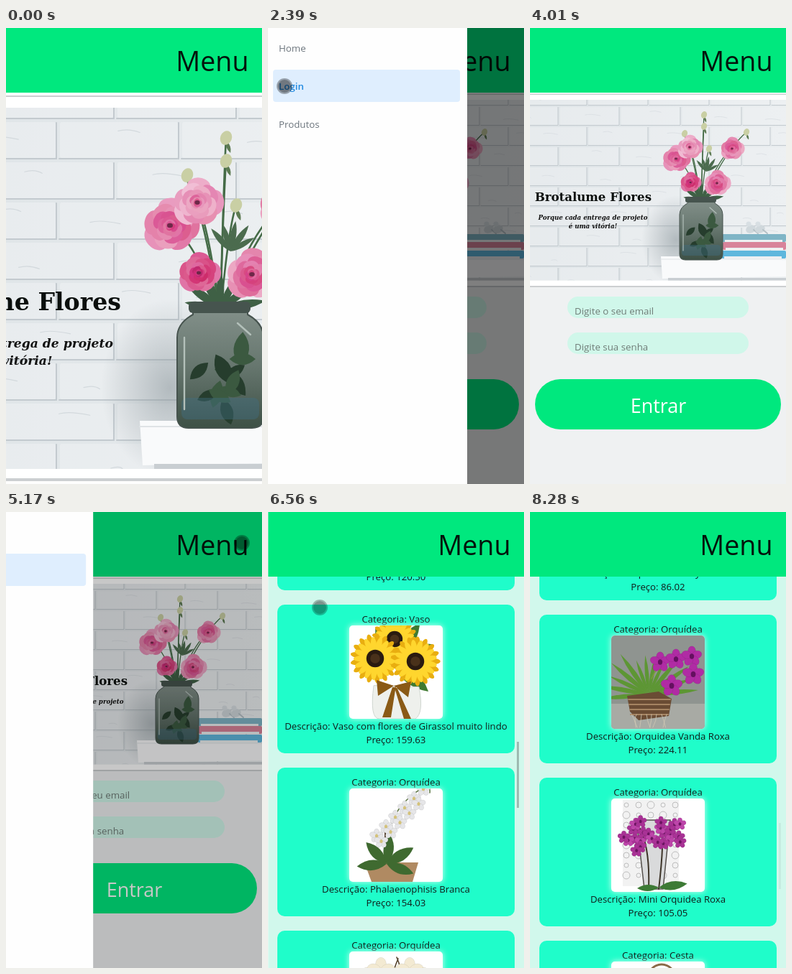
These frames come from a looping animation (356 by 635 pixels, 9060 ms). An HTML page:

```html
<!DOCTYPE html>
<html lang="pt-BR">
<head>
<meta charset="utf-8">
<title>Floricultura</title>
<style>
html, body { margin: 0; width: 100%; height: 100%; overflow: hidden; background: #fff; }
svg { display: block; width: 100%; height: 100%; }
text { font-family: "Open Sans", "Noto Sans", sans-serif; white-space: pre; }
.brand { font-family: "DejaVu Serif", serif; font-weight: 700; }
.slogan { font-style: italic; }
.glow { filter: drop-shadow(0 0 4px #d8fff4); }
.item { font-weight: 500; fill: #6c757d; }
.item.on { font-weight: 600; fill: #2089e0; }
</style>
</head>
<body>
<svg id="stage" viewBox="0 0 356 635"></svg>
<script>
const LOOP = 9060, FRAME = 76;
const GREEN = '#00e87e';
const DRAWER = 277;
const CARD_PITCH = 227, ITEM_PITCH = 53;
const GOLDEN = 137.5;

let seed = 7;
const rnd = (lo = 0, hi = 1) => lo + (hi - lo) * ((seed = seed * 16807 % 2147483647) / 2147483647);
const times = (n, fn) => Array.from({ length: n }, (_, i) => fn(i)).join('');
const polar = (x, y, dist, deg) =>
  [x + dist * Math.cos(deg * Math.PI / 180), y + dist * Math.sin(deg * Math.PI / 180)];

// Shapes
const rect = (x, y, w, h, fill, r = 0, more = '') =>
  `<rect x="${x}" y="${y}" width="${w}" height="${h}" rx="${r}" fill="${fill}" ${more}/>`;
const path = (d, fill, stroke = 'none', w = 1) =>
  `<path d="${d}" fill="${fill}" stroke="${stroke}" stroke-width="${w}" stroke-linecap="round"/>`;
const line = (d, stroke, w) => path(d, 'none', stroke, w);
const oval = (x, y, rx, ry, fill, turn = 0, more = '') =>
  `<ellipse cx="${x}" cy="${y}" rx="${rx}" ry="${ry}" fill="${fill}" transform="rotate(${turn} ${x} ${y})" ${more}/>`;
const text = (x, y, s, size, fill, more = '') =>
  `<text x="${x}" y="${y}" font-size="${size}" fill="${fill}" ${more}>${s}</text>`;
const mid = 'text-anchor="middle"';
const leaf = (x, y, len, turn, fill, wide = .3) =>
  `<g transform="translate(${x} ${y}) rotate(${turn})">${
    path(`M0 0Q${len / 2} ${-len * wide} ${len} 0Q${len / 2} ${len * wide} 0 0`, fill)}</g>`;
const fan = (x, y, n, len, from, to, fill, wide) =>
  times(n, i => leaf(x, y, len * rnd(.75, 1.1), from + (to - from) * i / (n - 1), fill, wide));
const ring = (x, y, n, dist, rx, ry, fill, phase = 0, more = '') => times(n, i => {
  const deg = phase + i * 360 / n;
  return oval(...polar(x, y, dist, deg), rx, ry, fill, deg, more);
});

// Ruffled petals that wind from the rim to the heart
const rose = (x, y, r, light) => times(26, i => {
  const inward = i / 26, size = r * (.42 - .3 * inward);
  return oval(...polar(x, y, r * .68 * (1 - inward), i * GOLDEN), size * 1.15, size * .85,
    `hsl(${334 + rnd(-3, 3)} 64% ${light + rnd(-8, 8) - 16 * inward}%)`, i * GOLDEN + 90);
}) + oval(x, y, r * .1, r * .08, '#6d2848');

const orchid = (x, y, r, petal, core) =>
  ring(x, y, 5, r * .55, r * .55, r * .42, petal, -90, 'stroke="#0002" stroke-width=".5"')
  + oval(x, y, r * .24, r * .28, core);

const sunflower = (x, y, r) => ring(x, y, 17, r * .66, r * .36, r * .13, '#e9ae10')
  + ring(x, y, 17, r * .55, r * .34, r * .12, '#ffd62e', 10)
  + oval(x, y, r * .36, r * .36, '#2a1b10') + oval(x, y, r * .2, r * .2, '#49311a');

// Brick courses, every second one shifted by half a brick
const wall = () => rect(0, 100, 356, 252, 'url(#light)') + times(10, row => times(5, i => {
  const x = (row % 2 ? 40 : 80) + 85 * (i - 1), y = 80.5 + row * 28;
  return rect(x + 1.5, y + 1.5, 82, 25, '#f1f4f6', 1.5, 'opacity=".5"')
    + line(`M${x + 1} ${y + 27}h83v-25`, '#c3cacf', 1)
    + line(`M${x + rnd(8, 50)} ${y + rnd(6, 20)}q7 -2 ${rnd(8, 22)} 1`, '#d3d9dd', .6);
})) + oval(203, 295, 48, 62, 'url(#dusk)');

const vase = () => path('M219 238h38v6q11 6 11 16v55q0 8-8 8h-44q-8 0-8-8v-55q0-10 11-16z', 'url(#glass)', '#46534e')
  + times(13, i => leaf(238 + rnd(-14, 14), 275 + i * 2.5, rnd(14, 24), i * GOLDEN, i % 2 ? '#263d2d' : '#3b5940', .45))
  + rect(211, 302, 54, 15, '#3f6f86', 4, 'opacity=".4"')
  + rect(216, 235, 43, 8, '#46544e', 3) + line('M213 260v50M250 250l9 8', '#b3c0ba', 1.2);

function bouquet() {
  const roses = [[203, 182, 20, 74], [222, 166, 18, 82], [281, 168, 17, 75], [223, 215, 15, 66], [260, 216, 19, 74]];
  const buds = [[242, 121], [215, 147], [301, 145], [249, 168], [242, 137]];
  return [...roses, ...buds].map(([x, y]) =>
      line(`M${x} ${y}Q${(x + 238) / 2} ${(y + 200) / 2} 238 245`, '#456b47', 1.3)).join('')
    + fan(238, 240, 7, 30, -170, -10, '#3f6045', .2) + fan(245, 200, 5, 22, -130, -30, '#4b6b4e', .2)
    + vase()
    + buds.map(([x, y]) => leaf(x, y + 2, 9, 70, '#5c7a52') + oval(x, y, 4, 5, '#c9cfa4', 20)).join('')
    + roses.map(r => rose(...r)).join('');
}

const book = (x, y, fill) => rect(x, y, 356 - x, 11, fill, 2) + rect(x + 4, y + 8, 80, 3, '#edf0f2');
const bird = x => oval(x, 280, 7, 5.5, '#d0d8dc', -25) + oval(x - 3, 273, 3.6, 3.6, '#d8dfe3')
  + line(`M${x + 4} 281l6 5`, '#b5c0c6', 2);

const photo = () => `<g id="photo" clip-path="url(#frame)">${wall()}
  ${path('M182 318H356V346L184 349z', '#f9fafb') + line('M182 322H356', '#dfe3e6') + rect(192, 348, 164, 4, '#c9ced2')}
  ${book(267, 287, '#7fb5c6') + book(268, 298, '#d8839a') + book(266, 310, '#5fb7dd')}
  ${bird(307) + bird(320) + bouquet()}
  ${text(169, 241, 'Brotalume Flores', 16.6, '#0b0f0d', 'class="brand" text-anchor="end"')}
  ${text(87.5, 267, 'Porque cada entrega de projeto', 8.6, '#111', `class="brand slogan" ${mid}`)}
  ${text(87.5, 279, 'é uma vitória!', 8.6, '#111', `class="brand slogan" ${mid}`)}</g>`;

// Product pictures, each 130 by 130
const pictures = {
  sunflower: () => fan(60, 50, 8, 62, -180, 40, '#3f7a31', .3)
    + path('M34 84Q28 130 42 130H92Q104 122 97 86z', '#eef0ec', '#cfd5cf')
    + sunflower(63, 19, 31) + sunflower(36, 46, 34) + sunflower(92, 50, 34)
    + path('M62 84L38 76L40 98zM62 84L86 78L82 100zM60 86L46 128H58L64 90L76 130H86L66 86z', '#8a5a16'),
  whiteOrchid: () => line('M52 102Q50 42 82 14T112 6', '#55703a', 1.5) + line('M50 104V56', '#564131', 2)
    + path('M21 103H96L88 130H31z', '#b08a62') + fan(52, 105, 5, 40, -185, 20, '#3f6a30', .35)
    + times(11, i => orchid(38 + i * 6.5, 72 - i * 6.5 + (i % 2 ? 8 : -6), 9, '#e6e6e8', '#d4c27a')),
  redOrchid: () => line('M60 110Q50 50 68 10M74 110Q80 40 66 8', '#4d3a22', 1.5)
    + fan(64, 112, 6, 50, -160, -20, '#4f8f35', .12) + path('M38 104H92L84 130H46z', '#b27a42')
    + times(5, i => orchid(24 + i * 20, i % 2 ? 28 : 42, 18, '#f3ead2', '#b92b1d')),
  vanda: () => rect(0, 0, 130, 130, '#8f9490') + rect(0, 95, 130, 35, '#a8aaa4')
    + fan(52, 82, 13, 66, -185, -5, '#5d9634', .1) + path('M22 84L66 78L84 88L80 112L38 118L26 106z', '#6a4c34')
    + times(4, i => line(`M${24 + i} ${89 + i * 7}H${82 - i}`, '#a58361', 2))
    + times(8, i => line(`M${28 + i * 7} 110q${rnd(-8, 8)} 8 ${rnd(-10, 10)} 18`, '#d0c8b4', .8))
    + line('M56 60Q70 26 116 26', '#7c9a3c', 1.5)
    + times(3, i => orchid(68 + i * 22, 37 - i * 4, 13, '#b02ba4', '#64105f'))
    + times(2, i => orchid(84 + i * 30, 70 - i * 16, 14, '#b02ba4', '#64105f')),
  miniOrchid: () => rect(16, 2, 78, 120, '#f2f2f2')
    + times(40, i => `<circle cx="${21 + i % 5 * 17}" cy="${9 + (i / 5 | 0) * 14}" r="${3 + i % 3}" fill="none" stroke="#bdbdbd"/>`)
    + path('M35 30H82L72 126H46z', '#d9dadb', '#55504c', 1.5) + line('M66 126Q74 60 70 32M52 126Q54 70 40 42', '#3d3428', 2)
    + leaf(66, 124, 30, 178, '#3d7a35') + leaf(66, 124, 40, -8, '#3d7a35')
    + times(24, i => orchid(...polar(i % 2 ? 36 : 82, i % 2 ? 53 : 49, 4.5 * Math.sqrt(i), i * GOLDEN), 8, '#a932966', '#6b1460')
      .replaceAll('#a932966', i % 3 ? '#a93296' : '#bd45aa')),
  basket: () => line('M40 90Q40 4 70 4T100 90', '#8a6a48', 3) + path('M30 80H108L98 126H40z', '#a77b4b') + rose(68, 66, 28, 70)
};

const products = [
  ['Vaso', 'Vaso com rosas', '120.50'],
  ['Vaso', 'Vaso com flores de Girassol muito lindo', '159.63', 'sunflower'],
  ['Orquídea', 'Phalaenophisis Branca', '154.03', 'whiteOrchid'],
  ['Orquídea', 'Orquidea Mini Cymbidium', '86.02', 'redOrchid'],
  ['Orquídea', 'Orquidea Vanda Roxa', '224.11', 'vanda'],
  ['Orquídea', 'Mini Orquidea Roxa', '105.05', 'miniOrchid'],
  ['Cesta', 'Cesta de flores', '98.40', 'basket']
];

const cardText = (y, s) => text(178, y, s, 13.2, '#101c18', mid);
const card = ([kind, about, price, picture], i) => `<g transform="translate(0 ${129 + (i - 1) * CARD_PITCH})">
  ${rect(13, 0, 330, 207, '#1ffdca', 10) + cardText(24.5, 'Categoria: ' + kind)}
  ${rect(113, 29, 130, 130, '#fff', 5, 'class="glow"')}
  <g transform="translate(113 29)" clip-path="url(#thumb)">${picture ? pictures[picture]() : ''}</g>
  ${cardText(174, 'Descrição: ' + about) + cardText(193, 'Preço: ' + price)}</g>`;

const field = (y, hint) => rect(52, y, 252, 30, '#d0f7ea', 15) + text(62, y + 25, hint, 13.3, '#6f7c77');
const rule = (y, h) => rect(0, y, 356, h, '#cccfd1');
const stops = (...colors) => colors.map((c, i) =>
  `<stop offset="${i / (colors.length - 1)}" stop-color="${c}"/>`).join('');

const stage = document.getElementById('stage');
stage.innerHTML = `<defs>
  <clipPath id="frame"><rect y="100" width="356" height="251.5"/></clipPath>
  <clipPath id="thumb"><rect width="130" height="130" rx="5"/></clipPath>
  <linearGradient id="light">${stops('#dde3e6', '#e9edef')}</linearGradient>
  <linearGradient id="glass" x2="0" y2="1">${stops('#84918b', '#66766e', '#3d5045')}</linearGradient>
  <radialGradient id="dusk">${stops('#8d989d99', '#8d989d00')}</radialGradient>
  ${photo()}</defs>
<g class="page">${rect(0, 90, 356, 545, '#fdfdfd') + rule(94, 2) + rule(627, 4) + rect(0, 97, 356, 530, '#fff')}
  <use href="#photo" transform="matrix(2 0 0 2 -178 -89)"/></g>
<g class="page">${rect(0, 90, 356, 545, '#eff1f2') + rect(0, 90, 356, 271, '#fff') + rule(91.5, 1.5) + rule(359, 2)}
  <use href="#photo"/>${field(374, 'Digite o seu email') + field(424, 'Digite sua senha')}
  ${rect(7, 489, 342, 70, GREEN, 35) + text(178.5, 535.5, 'Entrar', 27, '#fff', mid)}</g>
<g class="page">${rect(0, 90, 356, 545, '#d1f8ec')}<g id="list">${products.map(card).join('')}</g>
  ${rect(346, 320, 3, 92, '#000', 0, 'id="bar"')}</g>
${rect(0, 0, 356, 90, GREEN) + text(337.5, 59.5, 'Menu', 37.6, '#04140c', 'text-anchor="end"')}
${rect(0, 0, 356, 635, '#000', 0, 'id="shade"')}
<g id="drawer">${rect(0, 0, DRAWER, 635, '#fefefe') + rect(7, 5, 260, 45, '#dfeefe', 4, 'id="mark"')}
  ${['Home', 'Login', 'Produtos'].map((s, i) => text(15, 33 + i * ITEM_PITCH, s, 13.3, '', 'class="item"')).join('')}</g>
<g id="touch"><circle r="11" opacity=".32"/><circle r="9" opacity=".26"/></g>`;

// Each visit: the menu is tapped, an item is tapped, the next page appears
const visits = [{ menu: 830, item: 2070, go: 2390, itemY: 81, itemX: 23 },
                { menu: 5020, item: 6020, go: 6250, itemY: 133, itemX: 72 }];
const SWIPE = 7560;

const clamp = p => Math.min(1, Math.max(0, p));
const easeOut = p => 1 - (1 - p) ** 2;
const smooth = p => p * p * (3 - 2 * p);
const progress = (t, start, delay, span) =>
  clamp((Math.floor((t - start) / FRAME + .1) * FRAME - delay) / span);

const taps = visits.flatMap(v => [
  { start: v.menu, x: 328, y: 43, hold: 460 },
  { start: v.item, x: v.itemX, y: v.itemY, hold: 480 }
]).concat({ start: 3700, x: 324, y: 43, hold: 0 });

const openness = t => visits.reduce((sum, v) =>
  sum + easeOut(progress(t, v.menu, 77, 300)) - smooth(progress(t, v.go, 0, 310)), 0);
const scrolled = t => t < SWIPE ? 0 : 10 + 657 * easeOut(progress(t, SWIPE, 0, 4 * FRAME));

function touchAt(t) {
  if (t >= SWIPE && t < SWIPE + 2 * FRAME) return { x: 337, y: 282 - scrolled(t), alpha: 1 };
  const tap = taps.filter(tap => tap.start <= t).sort((a, b) => b.start - a.start)[0];
  return tap ? { ...tap, alpha: 1 - progress(t, tap.start, tap.hold, 4 * FRAME) } : { x: 0, y: 0, alpha: 0 };
}

const set = (id, name, value) => document.getElementById(id).setAttribute(name, value);
const pages = stage.querySelectorAll('.page');
const items = stage.querySelectorAll('.item');

function draw(t) {
  const page = visits.filter(v => t >= v.go).length;
  const open = openness(t), scroll = scrolled(t), touch = touchAt(t);
  pages.forEach((p, i) => p.setAttribute('display', i === page ? 'inline' : 'none'));
  items.forEach((s, i) => s.classList.toggle('on', i === page));
  set('mark', 'y', 5 + page * ITEM_PITCH);
  set('drawer', 'transform', `translate(${(open - 1) * DRAWER} 0)`);
  set('shade', 'opacity', open * .5);
  set('list', 'transform', `translate(0 ${-scroll})`);
  set('bar', 'y', Math.round(320 + scroll * 92 / 545));
  set('bar', 'opacity', .25 - .1 * Math.floor(2 * clamp((t - 7980) / 300)));
  set('touch', 'transform', `translate(${touch.x} ${touch.y})`);
  set('touch', 'opacity', touch.alpha);
}

function tick() {
  draw(performance.now() % LOOP);
  requestAnimationFrame(tick);
}
tick();
</script>
</body>
</html>
```
